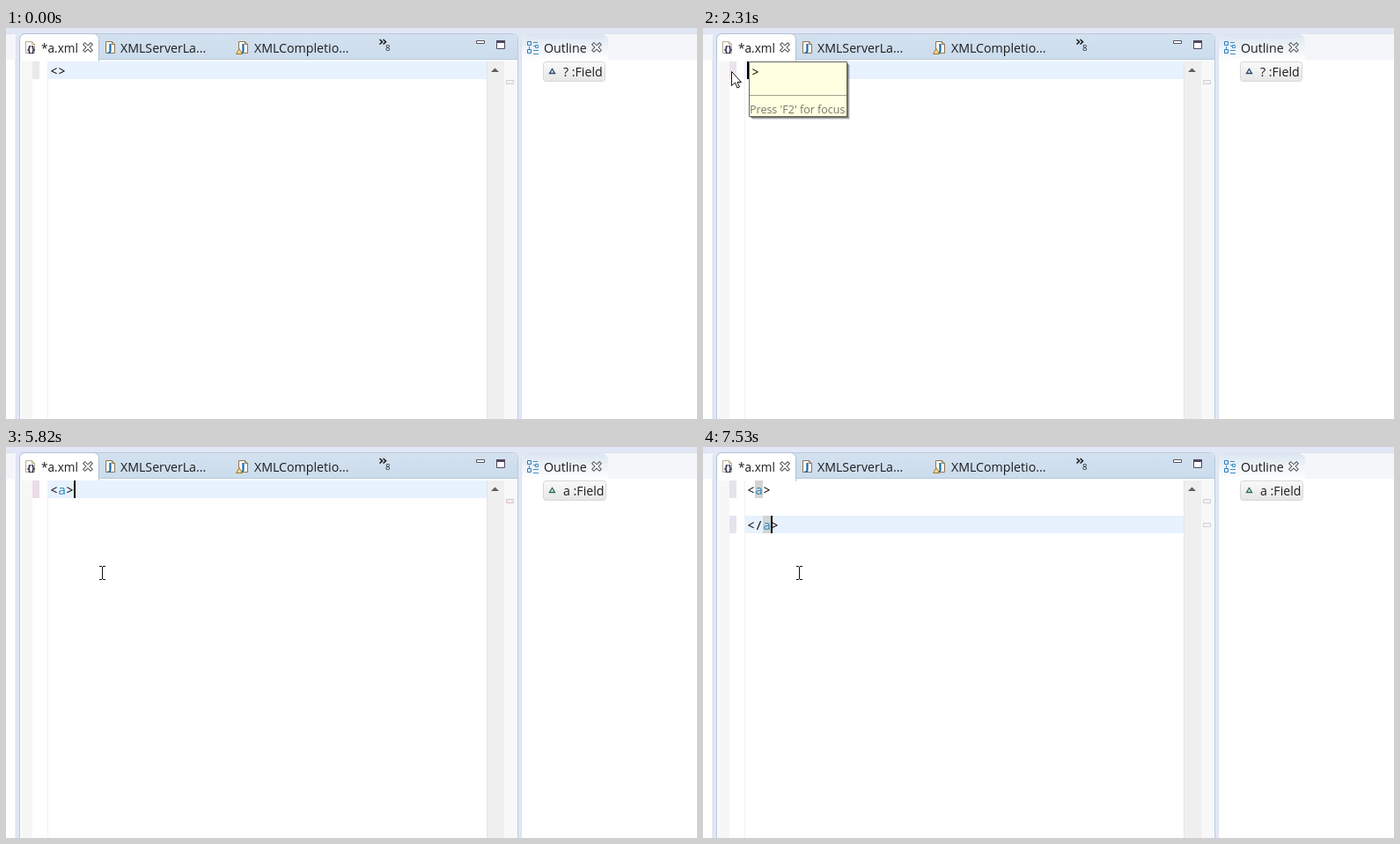
An HTML page with a canvas for the animation above (8000 ms loop, 785 by 444 pixels).

```html
<!DOCTYPE html>
<html lang="en">
<head>
<meta charset="utf-8">
<title>XML editor with outline</title>
<style>
html, body { margin: 0; width: 100%; height: 100%; overflow: hidden; background: #fff; }
canvas { display: block; }
</style>
</head>
<body>
<canvas id="stage" width="785" height="444"></canvas>
<script>
const ctx = document.getElementById('stage').getContext('2d');
const LOOP = 8000;
const UI = '"Open Sans", "Noto Sans", sans-serif';
const MONO = '"Noto Sans Mono", "DejaVu Sans Mono", monospace';
const GREY = '#e9e9e9', PINK = '#ecdcea', LILAC = '#e5e3ef';

const arrow = (x, y) => ({ pointer: { x, y } });
const beam = (x, y) => ({ pointer: { x, y, beam: true } });

// Each step overrides part of the state from its time onwards.
const start = {
  pointer: null, lines: ['<>'], row: 0, caret: null, selected: false, tip: false,
  marks: { 0: GREY }, ticks: { 0: GREY }, outline: ['? :Field'], triangle: '#30406e', occurrences: false
};
const steps = [
  [120, arrow(565, 443)],
  [220, { pointer: null }],
  [520, arrow(3, 52)],
  [590, beam(58, 82)],
  [770, beam(67, 74)],
  [846, beam(73, 62)],
  [922, beam(75, 50)],
  [998, arrow(66, 30)],
  [1074, arrow(59, 19)],
  [1150, arrow(52, 17)],
  [1226, arrow(45, 23)],
  [1302, arrow(38, 32)],
  [1400, { ...arrow(34, 38), selected: true, caret: 0, marks: { 0: '#eee2ee' } }],
  [1454, arrow(33, 40)],
  [1530, arrow(32, 42)],
  [1610, arrow(32, 49)],
  [1930, { caret: null }],
  [2080, { tip: true }],
  [2310, { lines: [''], selected: false, caret: 0 }],
  [2380, { marks: {}, ticks: {} }],
  [2460, { outline: [] }],
  [2930, { caret: null }],
  [3330, arrow(76, 82)],
  [3405, { ...beam(104, 122), tip: false }],
  [3480, { ...beam(109, 137), caret: 0 }],
  [3630, beam(109, 143)],
  [3880, { lines: ['<>'], caret: 1, marks: { 0: PINK }, ticks: { 0: PINK }, outline: ['? :Field'], triangle: '#2e6b50' }],
  [4420, { caret: null }],
  [4800, { lines: ['<a>'], caret: 2 }],
  [4880, { outline: ['a :Field'] }],
  [5350, { caret: null }],
  [5820, { caret: 3 }],
  [6360, { lines: ['<a>', ''], row: 1, caret: 0, marks: { 0: LILAC }, ticks: { 0: LILAC } }],
  [6680, { lines: ['<a>', '', ''], row: 2, marks: { 0: LILAC, 2: LILAC }, ticks: { 0: GREY, 2: GREY } }],
  [6930, { lines: ['<a>', '', '<>'], caret: 1, pointer: null }],
  [7000, { ...beam(109, 143), outline: ['a :Field', '? :Field'] }],
  [7300, { lines: ['<a>', '', '</>'], caret: 2, outline: ['a :Field'] }],
  [7530, { lines: ['<a>', '', '</a>'], caret: 3, occurrences: true }]
];

const stateAt = t => Object.assign({}, start, ...steps.filter(s => s[0] <= t).map(s => s[1]));

function box(x, y, w, h, fill) {
  ctx.fillStyle = fill;
  ctx.fillRect(x, y, w, h);
}

function text(str, x, y, size = 14.2, color = '#1c1c1c', family = UI, weight = 400) {
  ctx.font = `${weight} ${size}px ${family}`;
  ctx.fillStyle = color;
  ctx.fillText(str, x, y);
}

function rounded(x, y, w, h, radii, fill, stroke) {
  ctx.beginPath();
  ctx.roundRect(x, y, w, h, radii);
  if (fill) { ctx.fillStyle = fill; ctx.fill(); }
  if (stroke) { ctx.lineWidth = 1; ctx.strokeStyle = stroke; ctx.stroke(); }
}

function shape(points, fill, stroke, width = 1, closed = true) {
  ctx.beginPath();
  points.forEach(([x, y]) => ctx.lineTo(x, y));
  if (closed) ctx.closePath();
  if (fill) { ctx.fillStyle = fill; ctx.fill(); }
  if (stroke) { ctx.lineWidth = width; ctx.strokeStyle = stroke; ctx.stroke(); }
}

function fade(y0, y1, from, to) {
  const g = ctx.createLinearGradient(0, y0, 0, y1);
  g.addColorStop(0, from);
  g.addColorStop(1, to);
  return g;
}

function closeIcon(x, y) {
  ctx.lineCap = 'square';
  for (const [color, width] of [['#55565c', 4], ['#fff', 2]]) {
    for (const d of [-1, 1]) {
      shape([[x - 3.2, y - 3.2 * d], [x + 3.2, y + 3.2 * d]], null, color, width, false);
    }
  }
  ctx.lineCap = 'butt';
}

function page(x, y, edge) {
  shape([[x, y], [x + 7, y], [x + 10, y + 3], [x + 10, y + 13], [x, y + 13]], '#fdfcf6', edge);
  shape([[x + 7, y], [x + 7, y + 3], [x + 10, y + 3]], null, edge, 1, false);
}

function classIcon(x) {
  page(x, 15.5, '#8e744e');
  text('J', x + 3, 26, 11, '#1668a8', UI, 800);
}

function drawFrame() {
  box(0, 0, 785, 444, '#e2e7f6');

  // Neighbouring view on the left
  rounded(-10, 6.5, 21, 460, [0, 5, 0, 0], '#fff', '#d5dbea');
  box(0, 7, 11, 29, '#f4f6fa');

  // Editor and its tabs
  rounded(15.5, 6.5, 566, 460, [6, 6, 0, 0], '#fff', '#b9c8dc');
  rounded(16, 7, 565, 29, [6, 6, 0, 0], fade(7, 36, '#d3e1ef', '#cbdced'));
  box(16, 35, 565, 1, '#b5c7dc');
  rounded(15.5, 6.5, 90, 32, [6, 6, 0, 0], '#fff', '#b0c1d6');
  box(16, 35, 89, 5, '#fff');

  page(22.5, 15.5, '#b7ab8d');
  text('{}', 24, 28, 10.5, '#34345a', UI, 800);
  text('*a.xml', 40, 28, 13.6);
  closeIcon(93, 22);
  classIcon(113.5);
  text('XMLServerLa...', 130, 28);
  classIcon(264.5);
  shape([[261.5, 29.5], [265, 23.5], [268.5, 29.5]], '#f5d887', '#a27b34');
  text('XMLCompletio...', 282, 28);
  for (const x of [424.5, 428.5]) {
    shape([[x, 13], [x + 3, 15.7], [x, 18.5]], null, '#151515', 1.5, false);
  }
  text('8', 431, 26, 9.5, '#222');
  rounded(534.5, 14.5, 9, 3, 0, '#fff', '#55535f');
  rounded(557.5, 14.5, 9, 9, 0, '#fff', '#51465f');
  box(557, 14, 10, 3, '#51465f');

  // Rulers and scroll bar
  box(17, 38, 13, 406, '#f7f7f7');
  box(47, 38, 1, 406, '#f1f1f3');
  box(546, 38, 20, 406, '#efefef');
  box(546, 38, 1, 406, '#e5e5e5');
  box(566, 38, 14, 406, '#f8f8f8');
  shape([[551, 50], [555.5, 45.5], [560, 50]], '#606060');

  // Outline view
  rounded(585.5, 6.5, 220, 460, [6, 0, 0, 0], '#fff', '#dce2ed');
  rounded(586, 7, 199, 29, [6, 0, 0, 0], '#f4f6fa');
  rounded(586, 7, 98, 30, [6, 8, 0, 0], fade(7, 37, '#dce6f1', '#fff'));
  for (const [x, y] of [[592.5, 15.5], [592.5, 24.5]]) rounded(x, y, 4, 4, 0, '#e9f4fc', '#2c7dbb');
  for (const y of [16, 20, 25, 29]) box(599, y, y % 2 ? 6 : 5, 1, '#3c8cc4');
  box(594, 21, 1, 3, '#3c8cc4');
  rounded(601.5, 19.5, 3, 3, 0, '#fff', '#3c8cc4');
  text('Outline', 611, 28);
  closeIcon(671, 22);
}

function drawCode(s) {
  box(48, 38 + s.row * 20, 498, 20, '#e8f2fe');
  for (const r in s.marks) box(30, 38 + r * 20, 8, 20, s.marks[r]);
  for (const r in s.ticks) rounded(568.5, 59.5 + r * 13.5, 8, 4, 0, s.ticks[r] === PINK ? '#f8eaf3' : '#f3f3f5', s.ticks[r] === PINK ? '#dac5d2' : '#cfcfd4');
  if (s.selected) box(50, 38, 18, 20, '#3399ff');
  if (s.occurrences) {
    box(59, 38, 9, 20, '#d4d4d4');
    box(68, 78, 9, 20, '#d4d4d4');
  }
  s.lines.forEach((line, r) => [...line].forEach((c, i) => {
    const color = s.selected ? '#fff' : c === 'a' ? '#2a8fc4' : '#111';
    text(c, 50 + i * 9, 54 + r * 20, 15, color, MONO);
  }));
  if (s.caret !== null) {
    box(50 + s.caret * 9, 38 + s.row * 20, 2, 20, s.selected ? '#cc6600' : '#000');
  }
}

function drawOutline(s) {
  s.outline.forEach((label, i) => {
    const y = i * 23;
    if (!i) rounded(610.5, 38.5, label[0] === 'a' ? 71 : 70, 22, 3, fade(39, 61, '#f9f9f9', '#e6e6e6'), '#d8d8d8');
    shape([[617.5, 51.5 + y], [620.5, 46.5 + y], [623.5, 51.5 + y]], '#dfeee8', s.triangle, 1.3);
    text(label, 633, 55 + y);
  });
}

function drawTip() {
  box(56, 42, 111, 62, 'rgba(0,0,0,.12)');
  box(55, 41, 111, 62, 'rgba(0,0,0,.22)');
  box(54, 40, 111, 62, 'rgba(0,0,0,.35)');
  rounded(52.5, 38.5, 111, 62, 0, '#ffffe1', '#66665c');
  box(53, 76, 110, 1, '#a3a392');
  text('>', 55, 55, 15, '#111', MONO);
  text("Press 'F2' for focus", 53, 97, 12.5, '#77776a');
}

function drawPointer({ x, y, beam }) {
  if (beam) {
    box(x, y - 7, 1, 14, '#111');
    for (const side of [-3, 1]) {
      box(x + side, y - 8, 3, 1, '#111');
      box(x + side, y + 7, 3, 1, '#111');
    }
    return;
  }
  const outline = [[0, 0], [0, 16], [4, 12.5], [6.5, 18.5], [9, 17.5], [6.5, 12], [11, 12]];
  shape(outline.map(([dx, dy]) => [x + .5 + dx, y + .5 + dy]), '#fff', '#111');
}

function render(now) {
  const s = stateAt(now % LOOP);
  drawFrame();
  drawCode(s);
  drawOutline(s);
  if (s.tip) drawTip();
  if (s.pointer) drawPointer(s.pointer);
}

const begin = performance.now();
function tick() {
  render(performance.now() - begin);
  requestAnimationFrame(tick);
}
tick();
</script>
</body>
</html>
```
